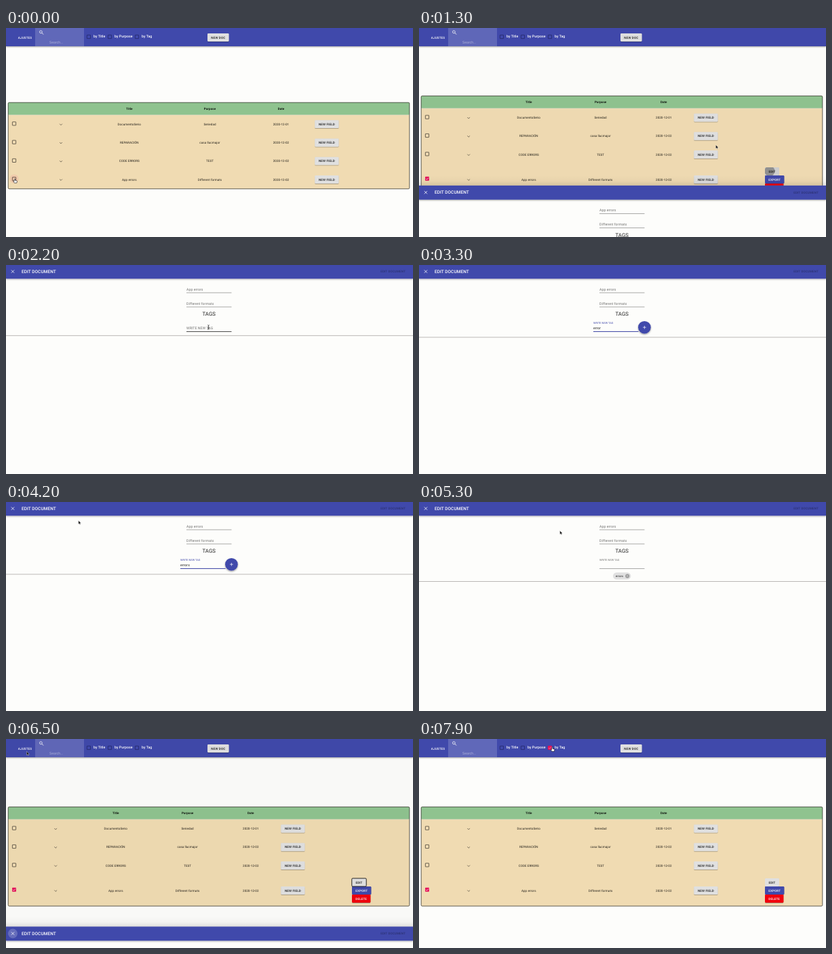
An HTML page that plays this animation: 600x309 px, repeating every 8000 ms.

```html
<!DOCTYPE html>
<html lang="en">
<head>
<meta charset="utf-8">
<title>Document manager</title>
<style>
  html, body { margin: 0; width: 100%; height: 100%; overflow: hidden; background: #fdfdfb; }
  svg { display: block; width: 100vw; height: 100vh; }
  text { font-family: Roboto, "Liberation Sans", sans-serif; text-rendering: geometricPrecision; white-space: pre; }
</style>
</head>
<body>
<svg id="stage" viewBox="0 0 600 309" preserveAspectRatio="none"></svg>
<script>
const LOOP = 8000;
const BLUE = '#4049ab', PINK = '#e5125a', INK = 'rgba(0,0,0,.87)', SOFT = 'rgba(0,0,0,.56)', PAGE = '#fdfdfb';

// Markup helpers
const rect = (x, y, w, h, fill, more = '') =>
  `<rect x="${x}" y="${y}" width="${w}" height="${h}" fill="${fill}" ${more}/>`;
const circle = (x, y, r, fill, more = '') => `<circle cx="${x}" cy="${y}" r="${r}" fill="${fill}" ${more}/>`;
const stroke = (d, color, width, more = '') =>
  `<path d="${d}" fill="none" stroke="${color}" stroke-width="${width}" ${more}/>`;
const label = (x, y, str, size, fill = INK, { weight = 400, anchor = 'start', gap = .0094, id = '' } = {}) =>
  `<text ${id && `id="${id}"`} x="${x}" y="${y}" font-size="${size}" fill="${fill}" font-weight="${weight}"
    text-anchor="${anchor}" letter-spacing="${gap * size}">${str}</text>`;
const group = (id, body, more = '') => `<g id="${id}" ${more}>${body}</g>`;

const caps = (x, y, str, fill) => label(x, y + 1.65, str, 4.55, fill, { weight: 500, anchor: 'middle', gap: .0286 });
const button = (x, y, w, str, fill = '#e0e0e0', ink = INK, id = '') =>
  rect(x, y - 6, w, 11.9, fill, `rx="1.3" filter="url(#low)" ${id && `id="${id}"`}`) + caps(x + w / 2, y, str, ink);
const emptyBox = (x, y, color) => rect(x - 2.6, y - 2.6, 5.2, 5.2, 'none', `rx=".4" stroke="${color}" stroke-width=".75"`);
const tickedBox = (x, y) => rect(x - 2.95, y - 2.95, 5.9, 5.9, PINK, 'rx=".7"') +
  stroke(`M${x - 1.9} ${y}l1.3 1.4l2.6 -2.7`, '#fff', .7);

const docs = [
  ['DocumentoSerio', 'Seriedad', '2020-12-01'],
  ['REPARACIÓN', 'casa llucmajor', '2020-12-02'],
  ['CODE ERRORS', 'TEST', '2020-12-02'],
  ['App errors', 'Different formats', '2020-12-02']
];

function table(id, top, height, headY, rows, cols, arrowX, buttonX, ticked) {
  const cell = (x, y, str, weight) => label(x, y + 1.65, str, 4.55, INK, { weight, anchor: 'middle', gap: .0107 });
  let out = rect(3, top, 592, height, '#f0dbb2', 'rx="1.6"') +
    rect(3, top, 592, 18.6, '#8fc38f', 'rx="1.6"') +
    rect(3, top + 18.4, 592, .5, '#e0e0e0', 'opacity=".7"') +
    rect(3.2, top + .2, 591.6, height - .4, 'none', 'rx="1.6" stroke="#3c3c38" stroke-width=".8"');
  ['Title', 'Purpose', 'Date'].forEach((name, i) => out += cell(cols[i], headY, name, 700));
  docs.forEach((doc, r) => {
    const y = rows[r];
    out += ticked && r === 3 ? tickedBox(12, y - 1.2) : emptyBox(12, y - .8, '#3f3a30');
    out += stroke(`M${arrowX - 1.9} ${y - .5}l1.9 1.9l1.9 -1.9`, '#3a362d', .65);
    doc.forEach((str, i) => out += cell(cols[i], y, str, 400));
    out += button(buttonX, y, 35.4, 'NEW FIELD');
  });
  return group(id, out);
}

const topBar = rect(0, 0, 600, 27, BLUE, 'filter="url(#bar)"') +
  rect(43, 0, 72, 27, 'rgba(255,255,255,.17)') +
  caps(28, 14, 'AJUSTES', '#fff') +
  circle(51.4, 5.8, 1.9, 'none', 'stroke="#fff" stroke-width=".75"') +
  stroke('M52.8 7.2l2.3 2.3', '#fff', .9) +
  label(64, 23.3, 'Search…', 5.2, 'rgba(255,255,255,.48)') +
  [[122, 'by Title'], [153, 'by Purpose'], [193, 'by Tag']].map(([x, str]) =>
    emptyBox(x, 13, '#222764') + label(x + 7, 14.2, str, 5.2, '#fff', { weight: 500 })).join('') +
  group('tagTick', tickedBox(193, 13) + circle(193, 13, 4, PINK, 'id="tagRipple"')) +
  button(297, 14, 31.6, 'NEW DOC');

const actions = group('actions',
  button(510, 212, 21, 'EDIT', '#e0e0e0', INK, 'edit') +
  '<g clip-path="url(#editClip)">' + circle(517, 211.6, 0, '#000', 'id="editRipple"') + '</g>' +
  button(510, 224, 28.4, 'EXPORT', BLUE, '#fff') +
  button(510, 236, 27.4, 'DELETE', '#f00008', '#fff') +
  rect(509.8, 206, 21.4, 12, 'none', 'id="editFocus" rx="1.3" stroke="#111" stroke-width=".9"'));

const field = (y, str) => label(266, y + 1.95, str, 5.2, SOFT) + rect(266, y + 5, 66.5, .8, 'rgba(0,0,0,.42)');

const tagField = group('tagField',
  rect(0, 98.1, 66.5, .8, 'rgba(0,0,0,.42)', 'id="tagLine"') +
  rect(0, 97.9, 66.5, 1, BLUE, 'id="focusLine"') +
  group('tagLabel', label(0, 0, 'WRITE NEW TAG', 5.2, 'inherit')) +
  label(0, 95.1, '', 5.2, INK, { id: 'typed' }));

const fab = group('fab', circle(332.4, 92.2, 9.3, BLUE, 'id="fabDisc" filter="url(#high)"') +
  stroke('M330.1 92.2h4.6M332.4 89.9v4.6', '#fff', .7));

const chip = group('chip', rect(286, 104.2, 26.3, 10.4, '#e0e0e0', 'rx="5.2"') +
  label(290, 110.9, 'errors', 4.2, INK) + circle(307.2, 109.4, 3, '#9b9b9b') +
  stroke('M306 108.2l2.4 2.4m0 -2.4l-2.4 2.4', '#e8e8e8', .6));

const dialog = group('dialog',
  rect(0, -15.6, 600, 15, 'url(#rise)') + rect(0, -.6, 600, 312, PAGE) +
  rect(0, -.6, 600, 20.8, BLUE, 'filter="url(#bar)"') +
  circle(10, 9.6, 7, '#fff', 'id="closeHalo"') +
  stroke('M7.8 7.4l4.4 4.4m0 -4.4l-4.4 4.4', '#fff', .75) +
  label(23, 11.9, 'EDIT DOCUMENT', 6.5, '#fff', { weight: 500, gap: .0075 }) +
  caps(570.6, 9.5, 'EDIT DOCUMENT', 'rgba(0,0,0,.32)') +
  field(35.6, 'App errors') + field(56.6, 'Different formats') +
  label(299.2, 75.3, 'TAGS', 7.8, INK, { anchor: 'middle', gap: 0 }) +
  tagField + fab + chip + rect(0, 0, 600, .8, '#aca8a6', 'id="divider"'));

const pointers = group('pointer',
  `<path id="arrow" d="M0 0V5.3L1.3 4.2L2.1 6L3 5.6L2.2 3.9L3.8 3.7Z" fill="#111" stroke="#fff" stroke-width=".35"/>
   <path id="hand" d="M-.7 .5Q0 -.5 .7 .5V2.4L3 2.9Q3.8 3.1 3.6 4L3 6.3H-.4L-2.1 3.9Q-1.9 3 -.7 3.9Z"
     fill="#fff" stroke="#111" stroke-width=".6"/>
   <path id="beam" d="M-1.3 -3.2Q0 -3.2 0 -2.4Q0 -3.2 1.3 -3.2M0 -2.6V2.6M-1.3 3.2Q0 3.2 0 2.4Q0 3.2 1.3 3.2M-.8 .9H.8"
     fill="none" stroke="#333" stroke-width=".75"/>`);

const shadow = (id, dy, blur, alpha) => `<filter id="${id}" x="-30%" y="-30%" width="160%" height="190%">
  <feDropShadow dx="0" dy="${dy}" stdDeviation="${blur}" flood-color="#000" flood-opacity="${alpha}"/></filter>`;

document.getElementById('stage').innerHTML = `<defs>
  ${shadow('low', .7, .6, .38)}${shadow('bar', .9, 1.1, .38)}${shadow('high', 1.2, 1.2, .4)}
  <clipPath id="editClip"><rect x="510" y="206" width="21" height="11.9" rx="1.3"/></clipPath>
  <linearGradient id="rise" x1="0" y1="0" x2="0" y2="1">
    <stop offset="0" stop-color="#000" stop-opacity="0"/><stop offset=".55" stop-color="#000" stop-opacity=".025"/>
    <stop offset="1" stop-color="#000" stop-opacity=".1"/></linearGradient></defs>` +
  rect(0, 0, 600, 309, PAGE) + topBar +
  table('plain', 110, 128, 119.2, [142.2, 169.5, 196.7, 224], [181.8, 300.5, 405.5], 81, 455.2, false) +
  table('picked', 100.2, 147, 109.7, [132.5, 159.8, 187.1, 224], [161.8, 267.6, 360.8], 73.2, 405.2, true) +
  circle(12, 223, 6.6, PINK, 'id="rowHalo"') + actions +
  rect(0, 0, 600, 309, '#000', 'id="backdrop"') + dialog + pointers;

const el = {};
document.querySelectorAll('[id]').forEach(node => el[node.id] = node);
const set = (id, attrs) => { for (const key in attrs) el[id].setAttribute(key, attrs[key]); };
const show = (id, on) => set(id, { visibility: on ? 'inherit' : 'hidden' });

// Timing helpers
const clamp = v => Math.min(1, Math.max(0, v));
const span = (t, start, length) => clamp((t - start) / length);
const mix = (a, b, k) => a + (b - a) * k;
const between = (t, a, b) => t >= a && t < b;
function bezier(x1, y1, x2, y2) {
  const at = (a, b, s) => 3 * a * s * (1 - s) ** 2 + 3 * b * s * s * (1 - s) + s ** 3;
  return x => {
    let lo = 0, hi = 1;
    for (let i = 0; i < 24; i++) {
      const mid = (lo + hi) / 2;
      if (at(x1, x2, mid) < x) lo = mid; else hi = mid;
    }
    return at(y1, y2, (lo + hi) / 2);
  };
}
const easeOut = bezier(0, 0, .2, 1), sharp = bezier(.4, 0, .6, 1), easeInOut = bezier(.4, 0, .2, 1);

// Pointer stops: time, x, y
const stops = [
  [0, 12.8, 222.8], [200, 12.8, 222.8], [850, 517, 211], [1080, 517, 211], [1300, 437.5, 173],
  [1800, 330, 120], [2200, 298.5, 92], [2480, 304.5, 98], [3350, 304.5, 98], [3580, 240, 168],
  [3800, 150, 92], [4200, 106.8, 27.5], [4580, 332, 91], [4800, 332, 91], [5300, 207.7, 42.5],
  [5580, 52, 13], [6100, 10.5, 9], [6370, 10.5, 9], [6500, 30.5, 18.5], [7250, 54, 12], [7750, 196.3, 12], [8000, 196.3, 12]
];
function pointerAt(t) {
  const i = stops.findIndex(s => s[0] > t);
  const [t0, x0, y0] = stops[i - 1], [t1, x1, y1] = stops[i];
  const k = span(t, t0, t1 - t0), s = k * k * (3 - 2 * k);
  return [mix(x0, x1, s), mix(y0, y1, s)];
}
const handTimes = [[0, 270], [780, 1130], [4500, 4850], [5950, 6400], [7700, 8000]];

const TICK = 200, PRESS = 1050, OPEN = 1284, FOCUS = 2380, TYPE = 2860, ADD = 4750, CLOSE = 6348, FILTER = 7800;

function drawPage(t) {
  const picked = t >= TICK;
  show('plain', !picked);
  show('picked', picked);
  show('actions', picked);
  set('rowHalo', { opacity: picked ? .2 * (1 - span(t, TICK, 350)) : .08 });
  set('edit', { fill: between(t, 820, OPEN + 300) ? '#d0d0d0' : '#e0e0e0' });
  set('editRipple', {
    r: 13 * easeInOut(span(t, PRESS, 650)),
    opacity: between(t, PRESS, 1700) ? .3 : 0
  });
  show('editFocus', between(t, CLOSE, FILTER));
  show('tagTick', t >= FILTER);
  set('tagRipple', { r: mix(2.5, 4.6, span(t, FILTER, 200)), opacity: .45 });
}

function drawDialog(t) {
  const open = between(t, OPEN, CLOSE + 195), leaving = t >= CLOSE;
  const leave = span(t, CLOSE, 195), enter = span(t, OPEN, 225);
  show('dialog', open);
  set('dialog', { transform: `translate(0 ${309 * (leaving ? sharp(leave) : 1 - easeOut(enter))})` });
  set('backdrop', { opacity: open ? .5 * (leaving ? 1 - easeInOut(leave) : easeInOut(enter)) : 0 });
  set('closeHalo', { opacity: leaving ? .2 : between(t, 5900, CLOSE) ? .09 : 0 });

  const typing = between(t, TYPE, ADD), focused = between(t, FOCUS, ADD);
  const shrink = easeOut(span(t, FOCUS, 200)), added = t >= ADD;
  set('tagField', { transform: `translate(${typing ? 257 : 266} 0)` });
  set('tagLabel', {
    transform: `translate(0 ${mix(95.1, 86.6, shrink)}) scale(${mix(1, .75, shrink)})`,
    fill: focused ? BLUE : SOFT
  });
  el.tagLabel.firstElementChild.setAttribute('fill', focused ? BLUE : SOFT);
  const hovered = between(t, 2120, FOCUS);
  set('tagLine', { fill: hovered ? INK : 'rgba(0,0,0,.42)' });
  set('focusLine', { transform: `translate(33.25 0) scale(${focused ? shrink : 0} 1) translate(-33.25 0)` });
  el.typed.textContent = typing ? 'errors'.slice(0, 1 + Math.floor((t - TYPE) / 95)) : '';
  show('fab', typing);
  set('fabDisc', { fill: t > 4520 ? '#343b8c' : BLUE });
  show('chip', added);
  set('divider', { y: added ? 117.2 : typing ? 106.5 : 103.9 });
}

function drawPointer(t) {
  const [x, y] = pointerAt(t);
  const hand = handTimes.some(([a, b]) => between(t, a, b)), beam = between(t, 2120, 2700);
  set('pointer', { transform: `translate(${x} ${y})` });
  show('pointer', !between(t, 2700, 3400));
  show('hand', hand);
  show('beam', beam);
  show('arrow', !hand && !beam);
}

function draw(t) {
  drawPage(t);
  drawDialog(t);
  drawPointer(t);
}

const begin = performance.now();
function tick() {
  draw((performance.now() - begin) % LOOP);
  requestAnimationFrame(tick);
}
tick();
</script>
</body>
</html>
```
